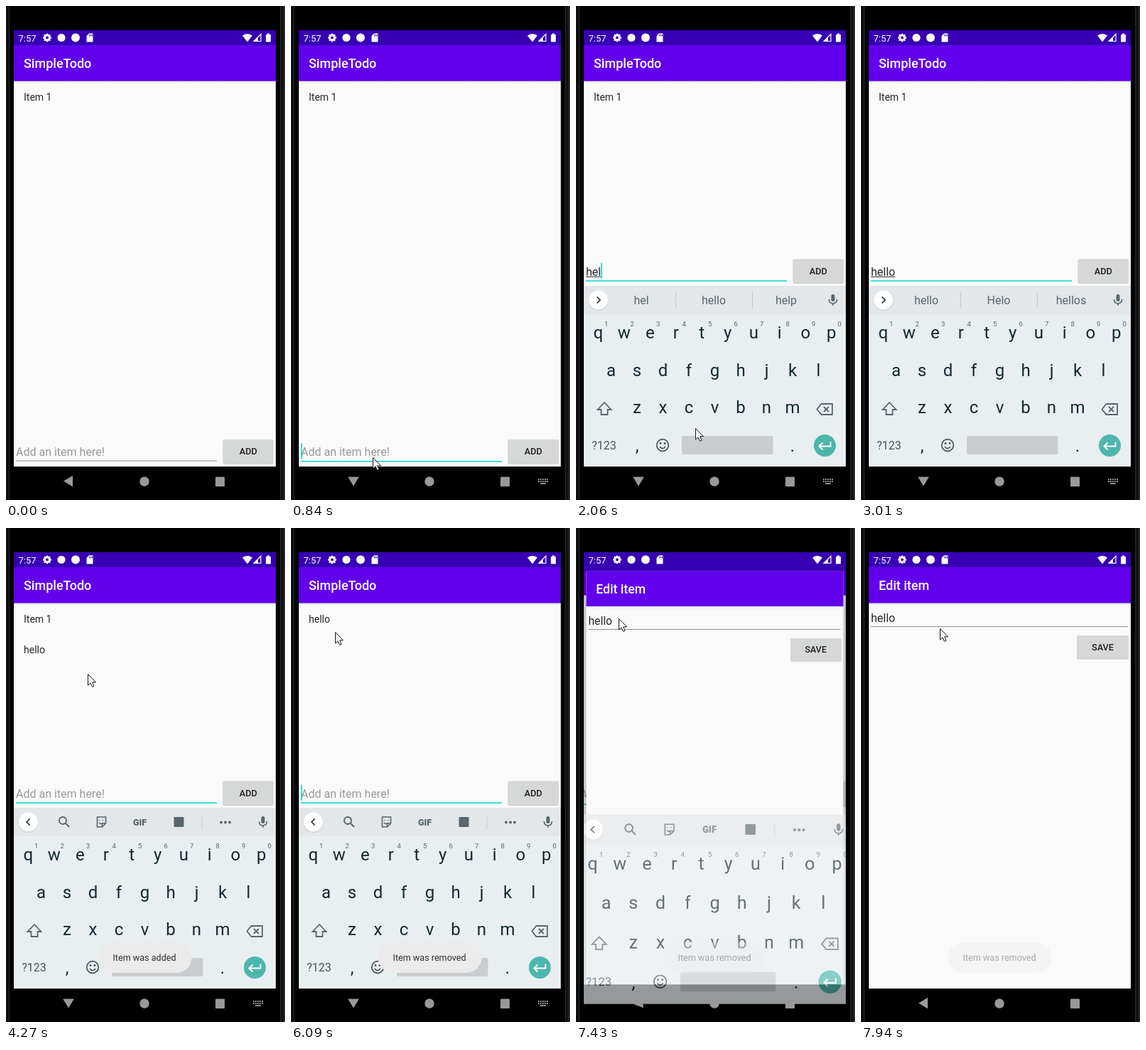
An HTML page with a canvas for the animation above (8 s loop, 393 by 694 pixels).

```html
<!DOCTYPE html>
<html lang="en">
<head>
<meta charset="utf-8">
<title>Todo list</title>
<style>
html, body { margin: 0; width: 100%; height: 100%; overflow: hidden; background: #000; }
canvas { display: block; width: 393px; height: 694px; }
</style>
</head>
<body>
<canvas id="stage" width="393" height="694"></canvas>
<script>
let c = document.getElementById('stage').getContext('2d');
const LOOP = 8000, STEP = 120;
const FOCUS = 720, BOARD = 990, TYPE = 2060, TYPED = 2360, ADDED = 3680, REMOVED = 5460, OPEN = 7430;
const INK = '#14282f', GREY = '#59666c', PAPER = '#fafafa', TEAL = '#03dac5';
const LEFT = 11, WIDTH = 369, BOTTOM = 647, MID = 195.5, PIVOT = 344;

const SUGGESTIONS = {
  hel: ['hel', 'hello', 'help'],
  hell: ['hell', 'hello', "he'll"],
  hello: ['hello', 'Helo', 'hellos']
};

// Pointer glides: start time, number of steps, destination.
const GLIDES = [
  [120, 5, 115, 634], [1230, 2, 168, 593], [2860, 1, 126, 234], [3280, 3, 345, 380],
  [3910, 4, 115, 205], [4390, 3, 57, 158], [4780, 1, 47, 126], [5730, 3, 62, 146],
  [6210, 2, 55, 129], [OPEN, 1, 60, 127], [7550, 4, 111, 141]
];

const ramp = (t, from, to) => Math.min(1, Math.max(0, (t - from) / (to - from)));
const held = (t, start) => start + Math.floor((t - start) / STEP) * STEP;

function pointerAt(t) {
  let x = 136, y = 690;
  for (const [start, steps, toX, toY] of GLIDES) {
    if (t < start) break;
    const p = Math.min(1, (Math.floor((t - start) / STEP) + 1) / steps);
    x += (toX - x) * p;
    y += (toY - y) * p;
  }
  return [x, y];
}

const pointerShown = t => t >= 120 && t < 2610 || t >= 2860 && t < 3010 || t >= 3280;

function typedAt(t) {
  if (t < TYPE || t >= ADDED) return '';
  return 'hello'.slice(0, 3 + Math.floor((t - TYPE) / 150));
}

// The blink restarts with every edit.
function caretOn(t) {
  const edit = [ADDED, TYPED, TYPE, FOCUS].find(time => t >= time);
  return edit !== undefined && (t - edit) % 1000 < 500;
}

const suggestionsAt = t => t < 3910 && SUGGESTIONS[typedAt(Math.min(t, ADDED - 1))] || [];

const leaving = t => t < OPEN ? 0 : ramp(held(t, OPEN), OPEN - 100, OPEN + 180);

function rect(x, y, w, h, fill, r = 0) {
  c.fillStyle = fill;
  c.beginPath();
  c.roundRect(x, y, w, h, r);
  c.fill();
}

function disc(x, y, r, fill) {
  c.fillStyle = fill;
  c.beginPath();
  c.arc(x, y, r, 0, 7);
  c.fill();
}

function text(s, x, y, size, fill, align = 'left', weight = 400) {
  c.font = `${weight} ${size}px Roboto, sans-serif`;
  c.textAlign = align;
  c.fillStyle = fill;
  c.fillText(s, x, y);
}

function shape(d, x, y, fill, stroke, width = 1.6) {
  const path = new Path2D(d);
  c.save();
  c.translate(x, y);
  if (fill) { c.fillStyle = fill; c.fill(path); }
  if (stroke) { c.strokeStyle = stroke; c.lineWidth = width; c.stroke(path); }
  c.restore();
}

function turned(x, y, angle, draw) {
  c.save();
  c.translate(x, y);
  c.rotate(angle);
  draw();
  c.restore();
}

function zoomed(scale, y, draw) {
  c.save();
  c.translate(MID, y);
  c.scale(scale, scale);
  c.translate(-MID, -y);
  draw();
  c.restore();
}

function clipped(y, h, draw) {
  c.save();
  c.beginPath();
  c.rect(LEFT, y, WIDTH, h);
  c.clip();
  draw();
  c.restore();
}

function bezel() {
  rect(0, 0, 393, 694, '#000');
  rect(0, 0, 4, 694, '#0d0d0d');
  rect(4, 0, 1, 694, '#292929');
  rect(386, 0, 7, 694, '#121212');
  rect(386, 0, 1, 694, '#2b2b2b');
  rect(391, 0, 2, 694, '#272727');
}

function statusBar(height) {
  rect(LEFT, 34, WIDTH, height, '#3700b3');
  text('7:57', 17.5, 49.5, 13, '#fff');
  for (let i = 0; i < 4; i++) {
    turned(58, 44.5, i * Math.PI / 4, () => rect(-1.4, -5.8, 2.8, 11.6, '#fff', 0.5));
  }
  disc(58, 44.5, 4.3, '#fff');
  disc(58, 44.5, 1.9, '#3700b3');
  disc(78, 44.5, 5.6, '#fff');
  disc(98, 44.5, 6, '#fff');
  shape('M-1-6H4.5V6H-4.5V-2.5Z', 118, 44.5, '#fff');
  for (let x = 117; x < 122; x += 2) rect(x, 40, 1, 2.5, '#3700b3');
  shape('M-7-3Q0-8 7-3L0 6Z', 340, 44.5, '#fff');
  shape('M-5 5L5-5V5Z', 354, 44.5, null, '#fff', 1.2);
  shape('M-5 5L1-1V5Z', 354, 44.5, '#fff');
  rect(366, 40, 7, 10.5, '#fff', 1);
  rect(368, 38.5, 3, 2, '#fff');
}

function page(title) {
  rect(LEFT, 55, WIDTH, BOTTOM - 55, PAPER);
  const shade = c.createLinearGradient(0, 105, 0, 109);
  shade.addColorStop(0, '#dedede');
  shade.addColorStop(1, PAPER);
  rect(LEFT, 105, WIDTH, 4, shade);
  rect(LEFT, 55, WIDTH, 50.4, '#6200ee');
  text(title, 25, 87, 18, '#fff', 'left', 500);
}

function button(label, x, y, w, h) {
  rect(x, y + 1, w, h, '#c9c9c9', 2);
  rect(x, y, w, h, '#d6d7d7', 2);
  text(label, x + w / 2, y + h / 2 + 4.5, 12.7, '#1f1f1f', 'center', 500);
}

function listScreen(t) {
  page('SimpleTodo');
  const items = t >= REMOVED ? ['hello'] : t >= ADDED ? ['Item 1', 'hello'] : ['Item 1'];
  items.forEach((item, i) => text(item, 25, 132.5 + i * 43, 14, '#272727'));

  const y = t >= BOARD ? 372 : 625.5, value = typedAt(t);
  text(value || 'Add an item here!', 14, y + 6.5, 16, value ? '#272727' : '#999');
  const width = value ? c.measureText(value).width : 0;
  rect(14, y + 8, width, 1, '#333');
  if (t >= FOCUS) rect(14, y + 13.5, 283, 1.6, TEAL);
  else rect(14, y + 13, 283, 1, '#8c8c8c');
  if (caretOn(t)) rect(14 + width, y - 11, 1.6, 22, TEAL);
  button('ADD', 305.5, y - 16.5, 71.5, 33.5);
}

function editScreen() {
  page('Edit item');
  text('hello', 14, 131.5, 16, '#272727');
  rect(14, 138, 362, 1, '#8c8c8c');
  button('SAVE', 304, 151, 73, 32.5);
}

function toolStrip(words) {
  rect(LEFT, 393, WIDTH, 40, '#e3e7ea');
  disc(31.5, 414, 14, '#d2d6d9');
  disc(31.5, 413, 13.5, '#fff');
  shape(words.length ? 'M-2-4.5L2.5 0L-2 4.5' : 'M2-4.5L-2.5 0L2 4.5', 31.5, 413, null, '#3d494f', 1.8);
  rect(359.5, 405, 5, 10, GREY, 2.5);
  shape('M-5.5-1Q-5.5 5 0 5T5.5-1M0 5V8', 362, 413, null, GREY);
  if (words.length) {
    words.forEach((word, i) => {
      text(word, 92 + 102 * i, 419, 16, GREY, 'center');
      if (i) rect(32 + 108 * i, 402, 1, 22, '#c3c8cb');
    });
    return;
  }
  shape('M4-2A5 5 0 1 1-6-2A5 5 0 1 1 4-2M2.5 1.5L8 7', 81, 413, null, GREY, 2);
  shape('M-6-7H6V2L1 7H-6ZM6 2H1V7M-3-3V-2M2-3V-2M-3.5 1Q-1 4 2 1', 134.5, 413, null, GREY);
  text('GIF', 188.5, 417.5, 12.5, GREY, 'center', 900);
  rect(236.5, 406, 14, 14, GREY, 1);
  rect(275.5, 403, 1, 21, '#c9ced1');
  for (let x = 303; x < 320; x += 6) disc(x, 413.5, 1.9, GREY);
}

function keyboard(words) {
  rect(LEFT, 393, WIDTH, BOTTOM - 393, '#e9eef1');
  toolStrip(words);
  ['qwertyuiop', 'asdfghjkl', 'zxcvbnm'].forEach((letters, row) => {
    const first = MID - 36.5 * (letters.length - 1) / 2;
    [...letters].forEach((key, i) => {
      const x = first + 36.5 * i;
      text(key, x, 467 + 52.7 * row, 24, INK, 'center');
      if (!row) text((i + 1) % 10, x + 11.5, 449.5, 9.5, GREY, 'center');
    });
  });
  shape('M0-9L9.5 1H4.5V8H-4.5V1H-9.5Z', 40, 566, null, GREY, 1.8);
  shape('M-11 0L-5-7.5H10.5V7.5H-5ZM-1.5-3.5L5.5 3.5M5.5-3.5L-1.5 3.5', 350.5, 566.5, null, GREY, 1.8);
  text('?123', 39.5, 622.5, 16, '#47555b', 'center');
  text(',', 86, 626, 24, INK, 'center');
  text('.', 305, 626, 24, INK, 'center');
  shape('M8.3 0A8.3 8.3 0 1 1-8.3 0A8.3 8.3 0 1 1 8.3 0M-4 2Q0 7 4 2', 122, 617, null, '#47555b', 1.7);
  disc(119, 614.5, 1.4, '#47555b');
  disc(125, 614.5, 1.4, '#47555b');
  rect(149, 604, 128.5, 26, '#c9cdd0', 2.5);
  disc(350.5, 617.5, 15.5, '#4db6ac');
  shape('M8-5V1H-7M-3-4L-8 1L-3 6', 350.5, 617.5, null, '#fff', 2);
}

// Fading happens on a separate layer, so that keys do not show through each other.
const layer = document.createElement('canvas');
layer.width = 786;
layer.height = 1388;
const layerPen = layer.getContext('2d');
layerPen.scale(2, 2);

function fadedKeyboard(words, alpha) {
  const main = c;
  c = layerPen;
  keyboard(words);
  c = main;
  c.globalAlpha = alpha;
  c.drawImage(layer, 0, 0, 393, 694);
  c.globalAlpha = 1;
}

function inputPanel(t) {
  if (t < BOARD) return;
  const enter = ramp(held(t, BOARD), BOARD - STEP, BOARD + STEP), leave = leaving(t);
  const alpha = enter * (1 - leave), words = suggestionsAt(t);
  clipped(34, 660, () => {
    c.translate(0, 72 * (1 - enter));
    zoomed(1 + 0.132 * leave, 189, () => {
      if (alpha === 1) keyboard(words);
      else if (alpha > 0) fadedKeyboard(words, alpha);
    });
  });
}

function navBar(t) {
  const turn = t < 840 ? 0 : -Math.PI / 2 * (1 - leaving(t)) ** 5;
  turned(88, 667.5, turn, () => shape('M-7 0L6-7.8V7.8Z', 0, 0, '#999'));
  disc(195, 668, 6.7, '#999');
  rect(295, 661.5, 13, 13.5, '#999', 1);
  if (t < 840 || t >= OPEN) return;
  for (let i = 0; i < 10; i++) rect(348 + i % 5 * 3, 664 + Math.floor(i / 5) * 3, 1.9, 1.9, '#999');
  rect(351, 670, 8, 1.8, '#999');
}

function toast(label, alpha) {
  c.globalAlpha = alpha;
  c.font = '12.6px Roboto, sans-serif';
  const width = c.measureText(label).width + 43;
  rect(MID - width / 2, 582, width, 43, '#ebebeb', 21.5);
  text(label, 195, 608, 12.6, '#303030', 'center');
  c.globalAlpha = 1;
}

function toasts(t) {
  toast('Item was added', ramp(t, 3850, 4030) * (1 - ramp(t, 5800, 5920)));
  toast('Item was removed', ramp(t, 5900, 6050) * Math.max(0.38, 1 - ramp(t, 7100, 7600)));
}

function screens(t) {
  const opening = t >= OPEN;
  const scale = opening ? 0.981 + 0.019 * ramp(held(t, OPEN), OPEN, OPEN + STEP) : 1;
  const moving = scale < 1;
  clipped(55, PIVOT + scale * (BOTTOM - PIVOT) - 55, () => {
    if (!opening || moving) zoomed(moving ? 1.046 : 1, PIVOT, () => listScreen(t));
    if (moving) rect(LEFT, 55, WIDTH, BOTTOM - 55, 'rgba(0,0,0,.2)');
    if (opening) zoomed(scale, PIVOT, editScreen);
  });
  statusBar(PIVOT - scale * (PIVOT - 55) - 34);
}

function render() {
  const t = performance.now() % LOOP;
  bezel();
  screens(t);
  inputPanel(t);
  navBar(t);
  toasts(t);
  if (pointerShown(t)) {
    shape('M.5.5V16L4 12.8L6.5 18.3L9 17.2L6.6 11.8H11.5Z', ...pointerAt(t), '#fff', '#111', 1);
  }
  requestAnimationFrame(render);
}
requestAnimationFrame(render);
</script>
</body>
</html>
```
